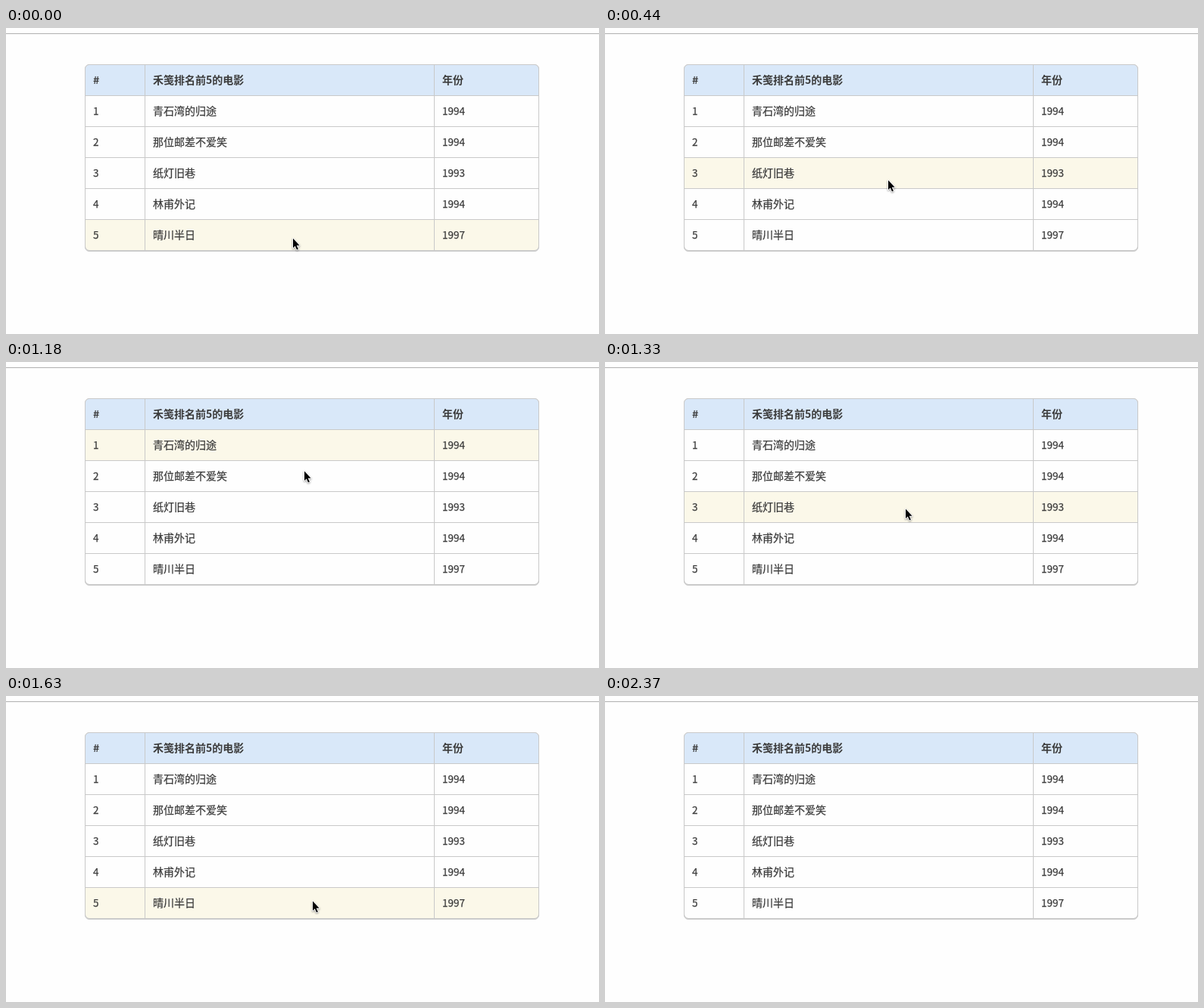
These frames come from a looping animation (783 by 405 pixels, 2910 ms). An HTML page:

```html
<!DOCTYPE html>
<html lang="zh-CN">
<head>
<meta charset="utf-8">
<title>Table row hover</title>
<style>
  html, body { margin: 0; width: 100%; height: 100%; overflow: hidden; background: #fefefe; }
  svg { display: block; width: 783px; height: 405px; }
  text {
    font: 500 14px "Noto Sans CJK SC", "Noto Sans CJK", sans-serif;
    fill: #3c3c3c; stroke: #3c3c3c; stroke-width: .25px;
  }
  .num { font-size: 13.5px; }
  .head { font-weight: 700; stroke: none; }
  .rule { fill: none; stroke: #c9c9c9; }
  #card { fill: #fefefe; stroke: #ccc; filter: drop-shadow(0 1px .5px #ccc); }
  #cursor { filter: drop-shadow(0 1px 1px rgba(0, 0, 0, .4)); }
</style>
</head>
<body>
<svg viewBox="0 0 783 405">
  <defs>
    <clipPath id="inside"><rect x="105" y="49" width="598" height="245" rx="5"/></clipPath>
  </defs>
  <path d="M0 7.5H783" stroke="#b0b0b0"/>
  <rect id="card" x="104.5" y="48.5" width="599" height="246" rx="5.5"/>
  <g clip-path="url(#inside)">
    <rect x="105" y="49" width="598" height="40" fill="#d9e8f9"/>
    <rect id="glow" x="105" y="49" width="598" height="40" fill="#fbf8e9"/>
  </g>
  <path class="rule" d="M105 89.5H703M105 130.5H703M105 171.5H703M105 212.5H703M105 253.5H703M183.5 49V294M565.5 49V294"/>
  <rect class="rule" x="104.5" y="48.5" width="599" height="246" rx="5.5"/>
  <g id="cells"></g>
  <g id="cursor">
    <path d="M1 1.6V14L3.8 11.4L6 16.4L7.9 15.5L5.7 10.8H9.6Z" fill="#000"
      stroke="#fff" stroke-width="1.8" stroke-linejoin="round" paint-order="stroke"/>
  </g>
</svg>
<script>
const LOOP = 2910, TICKS = 16, TOP = 49, ROW = 41, LAST = 5;
const $ = id => document.getElementById(id);

const rows = [
  ['#', '禾笺排名前5的电影', '年份'],
  ['1', '青石湾的归途', '1994'],
  ['2', '那位邮差不爱笑', '1994'],
  ['3', '纸灯旧巷', '1993'],
  ['4', '林甫外记', '1994'],
  ['5', '晴川半日', '1997']
];
const columns = [115, 194, 576];

rows.forEach((row, r) => row.forEach((label, c) => {
  const cell = document.createElementNS('http://www.w3.org/2000/svg', 'text');
  cell.setAttribute('x', columns[c]);
  cell.setAttribute('y', 74 + r * ROW);
  if (r === 0) cell.setAttribute('class', 'head');
  else if (c !== 1) cell.setAttribute('class', 'num');
  cell.textContent = label;
  $('cells').append(cell);
}));

// Turning points of the pointer: tick, x, y
const path = [
  [0, 378, 277], [2, 373, 245], [3, 373, 200], [5, 384, 115], [7, 390, 92],
  [10, 399, 244], [11, 404, 270], [13, 404, 272], [15, 656, 367]
];

function pointer(tick) {
  const end = Math.max(1, path.findIndex(p => p[0] >= tick));
  const [a, b] = [path[end - 1], path[end]];
  const f = Math.max(0, (tick - a[0]) / (b[0] - a[0]));
  return [1, 2].map(i => Math.round(a[i] + (b[i] - a[i]) * f));
}

// The glow trails the pointer a little and lingers just below the table.
function litRow(tick) {
  const row = (pointer(tick - .25)[1] - TOP) / ROW;
  return row < LAST + 1.5 ? Math.min(LAST, Math.floor(row)) : 0;
}

// The screen refreshes about every 149 ms, on whole hundredths of a second.
const tickTime = n => Math.max(0, Math.floor(14.9 * n - .69) * 10);

function play(el, pose) {
  const frames = Array.from({ length: TICKS }, (_, n) => (
    { offset: tickTime(n) / LOOP, easing: 'step-end', opacity: 1, ...pose(n) }
  ));
  const gone = { ...frames[TICKS - 1], opacity: 0 };
  frames.push({ ...gone, offset: tickTime(TICKS) / LOOP }, { ...gone, offset: 1 });
  el.animate(frames, { duration: LOOP, iterations: Infinity });
}

play($('cursor'), n => {
  const [x, y] = pointer(n);
  return { transform: `translate(${x}px, ${y}px)` };
});
play($('glow'), n => {
  const row = litRow(n);
  return { transform: `translate(0px, ${row * ROW}px)`, opacity: row ? 1 : 0 };
});
</script>
</body>
</html>
```
